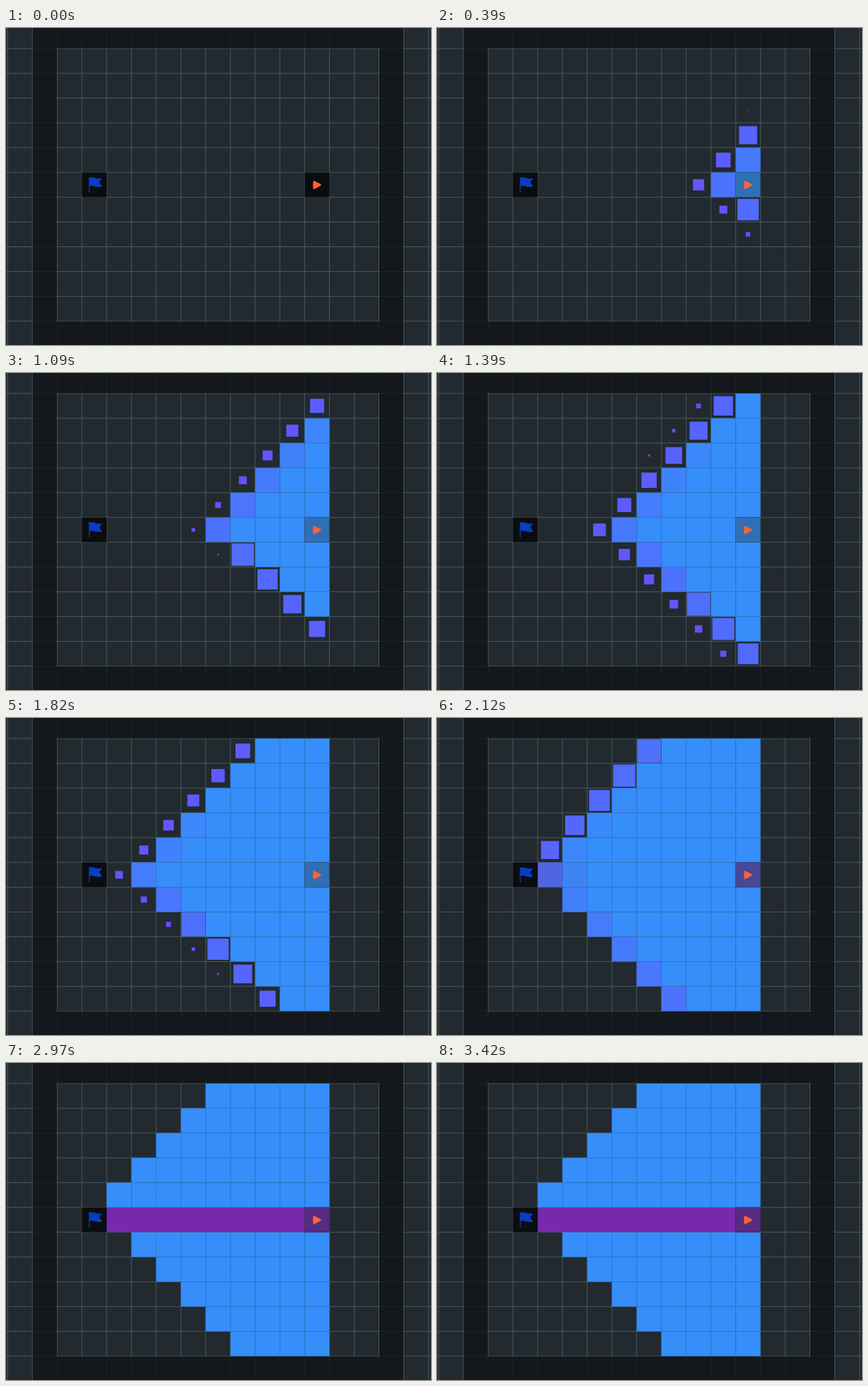
Animation of 600x447 px, one loop 3610 ms. Source, as an HTML page with a canvas:

```html
<!DOCTYPE html>
<html lang="en">
<head>
<meta charset="utf-8">
<title>Grid search</title>
<style>
html, body { margin: 0; width: 600px; height: 447px; overflow: hidden; background: #222a2f; }
canvas { display: block; }
</style>
</head>
<body>
<canvas id="stage" width="600" height="447"></canvas>
<script>
const ctx = document.getElementById('stage').getContext('2d');
const LOOP = 3610, CELL = 34.95, X0 = 2.3, Y0 = 28.9, ROWS = 11;
const START = { col: 12, row: 5 }, GOAL = { col: 3, row: 5 };
const GROW = 305, TINT = 455, FADE = 300;
const VIOLET = [109, 71, 255], BLUE = [54, 142, 250], PURPLE = [119, 41, 172];
const START_BLUE = [48, 111, 180], START_PURPLE = [88, 43, 130], DARK = [10, 13, 16];

// Pace of the search: cell index and the time it opens, linear in between
const PACE = [[0, 0], [17, 712], [31, 1070], [49, 1365], [57, 1622], [74, 1915]];

const clamp = v => Math.max(0, Math.min(1, v));
const mix = (a, b, p) => a.map((v, i) => v + (b[i] - v) * p);
const rgb = c => `rgb(${c.map(Math.round).join()})`;
const xOf = col => X0 + col * CELL;
const yOf = row => Y0 + row * CELL;

function openTime(k) {
  const i = PACE.findIndex(p => p[0] >= k);
  const [k0, t0] = PACE[i - 1], [k1, t1] = PACE[i];
  return t0 + (t1 - t0) * (k - k0) / (k1 - k0);
}

// Rings of equal step distance, each walked from top to bottom
function searchOrder() {
  const cells = [];
  for (let d = 1; ; d++) {
    for (let row = 0; row < ROWS; row++) {
      const dx = d - Math.abs(row - START.row), col = START.col - dx;
      if (dx < 0) continue;
      if (col === GOAL.col && row === GOAL.row) return cells;
      cells.push({ col, row, at: openTime(cells.length + 1) });
    }
  }
}
const cells = searchOrder();

function gridLines(color) {
  ctx.fillStyle = color;
  for (let c = 0; c < 18; c++) ctx.fillRect(xOf(c) - .5, 0, 1, 447);
  for (let r = 0; r <= ROWS; r++) ctx.fillRect(0, yOf(r) - .5, 600, 1);
}

function board() {
  ctx.fillStyle = '#222a2f';
  ctx.fillRect(0, 0, 600, 447);
  gridLines('#455a5e');

  const walls = new Path2D();
  const inner = CELL - 1;
  for (const col of [1, 15]) walls.rect(xOf(col) + .5, 0, inner, 447);
  for (const row of [-1, ROWS]) walls.rect(xOf(1) + .5, yOf(row) + .5, 15 * CELL - 1, inner);
  ctx.save();
  ctx.clip(walls);
  ctx.fillStyle = '#14171b';
  ctx.fillRect(0, 0, 600, 447);
  gridLines('rgba(69,90,94,.2)');
  ctx.restore();
}

function square(cell, color, scale, edge) {
  const size = CELL * scale;
  const x = xOf(cell.col) + (CELL - size) / 2, y = yOf(cell.row) + (CELL - size) / 2;
  ctx.fillStyle = rgb(color);
  ctx.fillRect(x, y, size, size);
  if (scale < 1 || !edge) return;
  ctx.strokeStyle = `rgba(40,95,150,${edge})`;
  ctx.lineWidth = 1;
  ctx.strokeRect(x, y, size, size);
}

function shape(path, color, outline = 0) {
  const p = new Path2D(path);
  ctx.fillStyle = ctx.strokeStyle = color;
  ctx.fill(p);
  if (!outline) return;
  ctx.lineWidth = outline;
  ctx.lineJoin = 'round';
  ctx.stroke(p);
}

function flag() {
  square(GOAL, DARK, 1, 0);
  shape('M116.8 210h1.5v22h-1.5z', '#11378c');
  shape('M118 210.8Q122 210 126 211.4T136 212L131.6 217.6L136 223.8Q130 224.6 126 223.4T118 222.8Z', '#0a3cc4');
}

const arrow = () => shape('M435 217L443.4 221.3L435 225.8Q434.4 221.3 435 217Z', '#ff6238', 2.8);

// The route fills from the goal side towards the start
const routeShare = (cell, t) =>
  cell.row === GOAL.row ? clamp((t - 2020 - (cell.col - 4) * 70) / FADE) : 0;

function draw(t) {
  board();
  for (const cell of cells) {
    const age = t - cell.at;
    if (age <= 0) continue;
    const base = mix(VIOLET, BLUE, clamp(age / TINT) ** 1.25);
    const share = routeShare(cell, t);
    square(cell, mix(base, PURPLE, share), clamp(age / GROW), .27 * (1 - .8 * share));
  }
  square(START, DARK, 1, 0);
  const tint = mix(START_BLUE, START_PURPLE, clamp((t - 1950) / FADE));
  square(START, tint, clamp(t / GROW), 0);
  arrow();
  flag();
}

let origin;
function tick(now) {
  origin ??= now;
  draw((now - origin) % LOOP);
  requestAnimationFrame(tick);
}
draw(0);
requestAnimationFrame(tick);
</script>
</body>
</html>
```
